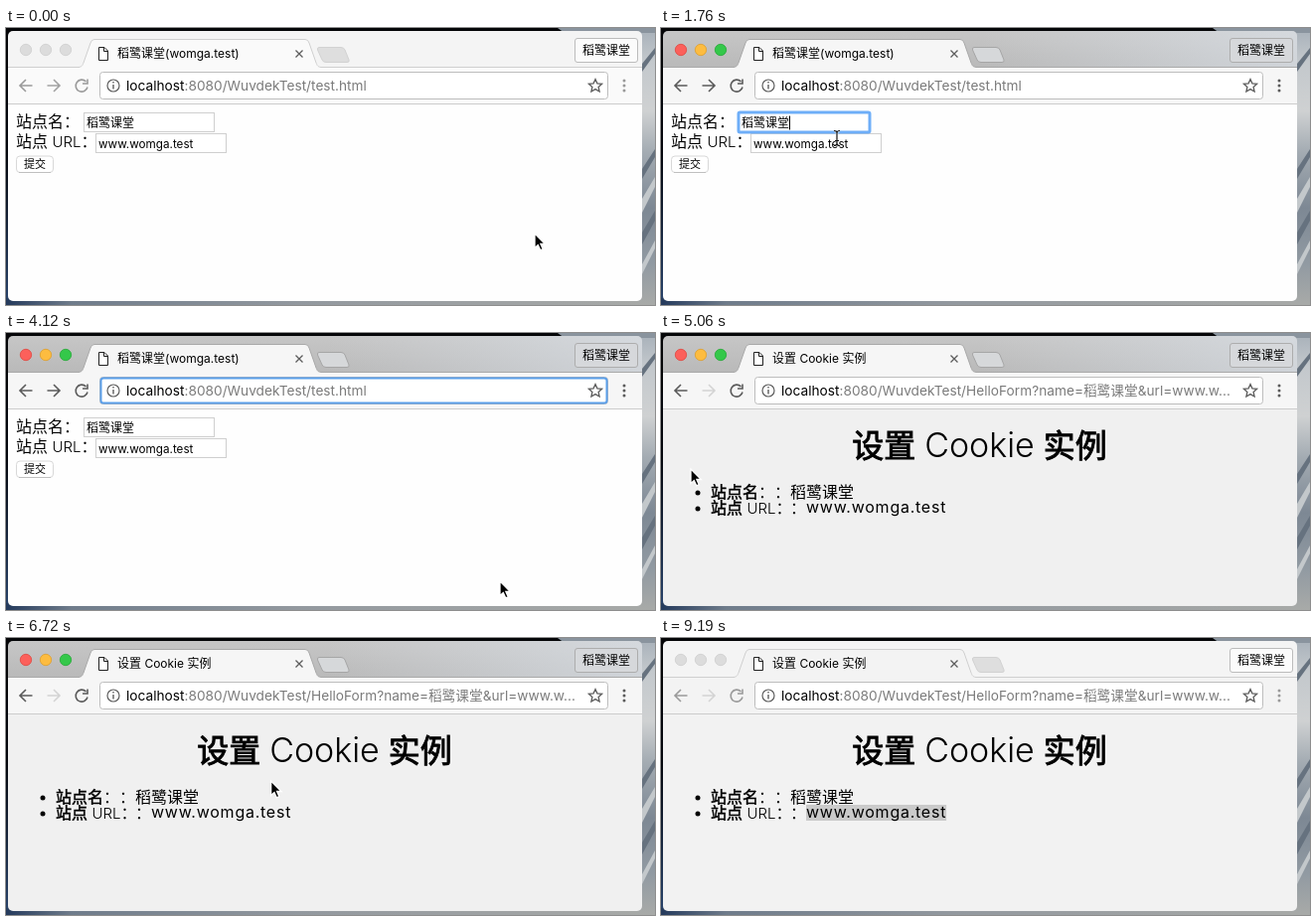
Write an HTML page that moves like this. It is 653 px wide and 279 px high and loops after 9290 ms.

```html
<!DOCTYPE html>
<html lang="zh-CN">
<head>
<meta charset="utf-8">
<title>Form demo</title>
<style>
html, body { margin: 0; width: 100%; height: 100%; overflow: hidden; background: #000; }
svg { display: block; width: 653px; height: 279px; }
text { font-family: Inter, "Noto Sans CJK SC", "Noto Sans CJK", sans-serif; fill: #000; white-space: pre; }
.strip { fill: #f4f4f4; }
.bar { fill: #fafafa; }
.done .bar { fill: #f3f3f3; }
.sheen { display: none; }
.edge { stroke: #cfcfcf; fill: none; }
.plus { fill: #dedede; stroke: #d2d2d2; }
.badge { fill: #fbfbfb; stroke: #bcbcbc; }
.light { fill: #dcdcdc; stroke: #cfcfcf; stroke-width: .8; }
.icon { fill: none; stroke: #9b9b9b; stroke-width: 1.6; }
.dots { fill: #999; }
.next { stroke: #a2a2a2; }
.mark { fill: #cacaca; }
.on .strip { fill: url(#chrome); }
.on .sheen { display: inline; }
.on .bar { fill: #f6f6f6; }
.on .edge { stroke: #a9a9a9; }
.on .plus { fill: #d6d8da; stroke: #a6a6a6; }
.on .badge { fill: #d6d8db; stroke: #adadad; }
.on .icon { stroke: #5b5b5b; }
.on .dots { fill: #5b5b5b; }
.on .red { fill: #fc605b; stroke: #e0473f; }
.on .amber { fill: #fdbc40; stroke: #dd9f2c; }
.on .green { fill: #34c84a; stroke: #25a937; }
.on .mark { fill: #a9cdf5; }
.done .next, .on.done .next { stroke: #d4d4d4; }
.page { fill: #fefefe; }
.done .page { fill: #f2f2f2; }
.on.done .page { fill: #f0f0f0; }
.box { fill: #fff; stroke: #cfcfcf; }
.ring { fill: none; stroke: #6eaef8; stroke-width: 3; }
.grey { fill: #7b7b7b; }
.b { stroke: #000; stroke-width: .03em; }
.thin { font-weight: 300; }
</style>
</head>
<body>
<svg id="stage" viewBox="0 0 653 279">
  <defs>
    <linearGradient id="chrome" x2="0" y2="1">
      <stop stop-color="#c6c6c6"/><stop offset="1" stop-color="#b9b9b9"/>
    </linearGradient>
    <linearGradient id="sheen">
      <stop offset=".5" stop-color="#dfe6ee" stop-opacity="0"/><stop offset="1" stop-color="#dfe6ee" stop-opacity=".6"/>
    </linearGradient>
    <linearGradient id="side" x2="0" y2="1">
      <stop stop-color="#a7b0b9"/><stop offset=".12" stop-color="#c3c8cc"/>
      <stop offset=".3" stop-color="#cfd1d2"/><stop offset=".45" stop-color="#a3abb2"/>
      <stop offset=".65" stop-color="#7d8894"/><stop offset=".85" stop-color="#919aa2"/>
      <stop offset="1" stop-color="#a8aaa8"/>
    </linearGradient>
    <linearGradient id="floor">
      <stop stop-color="#243a5c"/><stop offset=".1" stop-color="#6f7c8b"/>
      <stop offset=".45" stop-color="#93999f"/><stop offset="1" stop-color="#a8aaa8"/>
    </linearGradient>
    <linearGradient id="left" x2="0" y2="1">
      <stop offset=".3" stop-color="#05070d"/><stop offset="1" stop-color="#29446c"/>
    </linearGradient>
    <clipPath id="win"><rect x="2" y="3" width="638" height="272" rx="5"/></clipPath>
  </defs>

  <rect width="653" height="279" fill="#050608"/>
  <rect y="60" width="3" height="219" fill="url(#left)"/>
  <rect y="272" width="653" height="7" fill="url(#floor)"/>
  <rect x="634" width="19" height="279" fill="url(#side)"/>
  <path d="M555 0H653V5H562Z" fill="#8a949e"/>
  <path d="M640 172L653 150V160L640 186ZM640 238L653 214V222L640 248Z" fill="#c3c8cb"/>
  <path d="M640 36L653 20V26L640 44ZM640 142L653 122V130L640 152ZM640 206L653 184V194L640 218Z" fill="#66727f"/>

  <g clip-path="url(#win)">
    <rect class="strip" x="2" y="3" width="638" height="37"/>
    <rect class="sheen" x="2" y="3" width="638" height="37" fill="url(#sheen)"/>
    <rect class="bar" x="2" y="39" width="638" height="38"/>
    <path class="edge" d="M2 39.5H74M317 39.5H640"/>
    <path class="bar" d="M73 40C77 39 77 37 78 35L85 15Q86 11.500 89 11.500H301Q304 11.500 305 15L312 35C313 37 313 39 317 40Z"/>
    <path class="edge" d="M73 39.500C77 39 77 37 78 35L85 15Q86 11.500 89 11.500H301Q304 11.500 305 15L312 35C313 37 313 39 317 39.500"/>
    <path class="plus" d="M315 19.500H337Q340 19.500 341 22L345 32Q346 34.500 343 34.500H322Q319 34.500 318 32L313.500 22Q313 19.500 315 19.500Z"/>
    <circle class="light red" cx="20" cy="22" r="5.700"/>
    <circle class="light amber" cx="40" cy="22" r="5.700"/>
    <circle class="light green" cx="60" cy="22" r="5.700"/>
    <path d="M93.500 19.500H99L102.500 23V32.500H93.500ZM98.500 19.500V23.500H102.500" fill="#fff" stroke="#222"/>
    <text id="title" x="112" y="30" font-size="12"></text>
    <path d="M291.500 22.500l7 7m0-7l-7 7" stroke="#5c5c5c" stroke-width="1.300"/>
    <rect class="badge" x="572.500" y="10.500" width="63" height="24" rx="2.500"/>
    <text id="badge" x="580" y="27" font-size="12"></text>

    <path class="icon" d="M26.500 58H14.500M20 52L14 58L20 64"/>
    <path class="icon next" d="M41.500 58H53.500M48 52L54 58L48 64"/>
    <path class="icon" d="M80.500 54A6 6 0 1 0 82 59.500M82 51.500V56H77"/>
    <rect class="box" x="94.500" y="44.500" width="511" height="27" rx="3" style="stroke:#bdbdbd"/>
    <rect id="omni" x="95.500" y="45.500" width="509" height="25" rx="2.500" fill="none" stroke="#5b9fe9" stroke-width="2"/>
    <circle cx="108" cy="58" r="6" fill="none" stroke="#5d5d5d" stroke-width="1.200"/>
    <path d="M108 57V61.500M108 54V55.500" stroke="#5d5d5d" stroke-width="1.400"/>
    <text x="121" y="63" font-size="13.700">localhost<tspan id="url" class="grey"></tspan></text>
    <path d="M593 51.500l1.900 4.300 4.700.5-3.500 3.100 1 4.600-4.100-2.400-4.100 2.400 1-4.600-3.500-3.100 4.700-.5Z" fill="none" stroke="#5d5d5d" stroke-width="1.300"/>
    <g class="dots"><circle cx="622" cy="53" r="1.500"/><circle cx="622" cy="58" r="1.500"/><circle cx="622" cy="63" r="1.500"/></g>

    <rect class="page" x="2" y="76" width="638" height="200"/>
    <path class="edge" d="M2 76.500H640" style="stroke:#cccccc"/>

    <g id="form">
      <text x="10" y="100" font-size="16">站点名：</text>
      <text x="10" y="120" font-size="16">站点 <tspan class="thin" font-size="15">URL</tspan>：</text>
      <rect class="box" x="78.500" y="85.500" width="131" height="19"/>
      <rect class="box" x="90.500" y="106.500" width="131" height="19"/>
      <rect class="ring" id="ring1" x="78" y="85" width="132" height="20" rx="1.500"/>
      <rect class="ring" id="ring2" x="90" y="106" width="132" height="20" rx="1.500"/>
      <text id="field1" x="81" y="100" font-size="12"></text>
      <text id="field2" x="93" y="121" font-size="11.700"></text>
      <rect x="10.500" y="129" width="37" height="16.500" rx="3.500" fill="#fff" stroke="#d8d8d8"/>
      <path d="M13 145.500H45" stroke="#bfbfbf"/>
      <text x="29" y="141" font-size="11" text-anchor="middle">提交</text>
    </g>

    <g id="result">
      <text x="320.500" y="125" font-size="32" text-anchor="middle"><tspan class="b">设置</tspan> <tspan class="thin" font-size="34">Cookie</tspan> <tspan class="b">实例</tspan></text>
      <rect class="mark" id="mark1" x="130" y="152" height="16"/>
      <rect class="mark" id="mark2" x="146" y="168" height="16"/>
      <circle cx="37" cy="161" r="2.500"/><circle cx="37" cy="177" r="2.500"/>
      <g font-size="16">
        <text x="50" y="166"><tspan class="b">站点名</tspan>：</text><text x="114" y="166">：</text>
        <text id="out1" x="130" y="166"></text>
        <text x="50" y="182"><tspan class="b">站点</tspan> <tspan class="thin" font-size="15">URL</tspan>：</text><text x="130" y="182">：</text>
        <text id="out2" x="146" y="181" letter-spacing=".75"></text>
      </g>
    </g>
    <path id="caret" stroke="#000"/>
  </g>

  <path id="arrow" d="M0 0V14.500L3.300 11.500 5.700 16.800 8.200 15.700 5.900 10.500H10.400Z" fill="#000" stroke="#fff" stroke-width="1.300"/>
  <g id="beam" fill="none">
    <path d="M-3-7.500Q0-7.500 0-5.500Q0-7.500 3-7.500M0-5.500V5.500M-3 7.500Q0 7.500 0 5.500Q0 7.500 3 7.500M-2 2.500H2" stroke="#fff" stroke-width="2.600" opacity=".7"/>
    <path d="M-3-7.500Q0-7.500 0-5.500Q0-7.500 3-7.500M0-5.500V5.500M-3 7.500Q0 7.500 0 5.500Q0 7.500 3 7.500M-2 2.500H2" stroke="#111" stroke-width="1.200"/>
  </g>
</svg>
<script>
const LOOP = 9290, TICK = 117.7;
const SITE = '稻鹭课堂', HOST = 'womga.test';
const $ = id => document.getElementById(id);
const show = (id, on) => $(id).setAttribute('display', on ? 'inline' : 'none');
const put = (id, s) => { if ($(id).textContent !== s) $(id).textContent = s; };

// Pointer path: tick, x, y, shape used from here on
const path = [
  [0, 532, 207, 'arrow'], [2, 533, 208, 'arrow'], [3, 532, 207, 'arrow'], [6, 532, 207, 'arrow'],
  [8, 440, 172, 'arrow'], [10, 240, 110, 'beam'], [12, 178, 97, 'beam'], [14, 178, 97, 'beam'],
  [15, 177, 111, 'beam'], [16, 175, 116, 'beam'], [18, 175, 116, 'arrow'], [22, 334, 79, 'beam'],
  [23, 335, 66, 'beam'], [30, 335, 65, 'arrow'], [33, 533, 258, 'arrow'], [35, 497, 250, 'arrow'],
  [38, 84, 145, 'arrow'], [40, 30, 137, 'arrow'], [43, 30, 137, 'arrow'], [46, 91, 134, 'arrow'],
  [48, 189, 130, 'arrow'], [51, 440, 115, 'arrow'], [53, 492, 113, 'arrow'], [55, 480, 116, 'arrow'],
  [58, 160, 158, 'beam'], [59, 131, 160, 'beam'], [62, 195, 161, 'beam'], [64, 185, 172, 'beam'],
  [65, 167, 178, 'beam'], [66, 146, 177, 'beam'], [69, 300, 178, 'beam'], [70, 389, 184, 'arrow'],
  [72, 500, 235, 'arrow'], [73, 606, 281, 'arrow']
];

function pointer(k) {
  let i = path.length - 1;
  while (path[i][0] > k) i--;
  const a = path[i], b = path[i + 1] || a;
  const u = b === a ? 0 : (k - a[0]) / (b[0] - a[0]);
  return { x: a[1] + (b[1] - a[1]) * u, y: a[2] + (b[2] - a[2]) * u, shape: a[3] };
}

function select(id, out, x, dragging, on, px) {
  const full = $(out).getComputedTextLength();
  const w = dragging ? Math.min(full, Math.max(0, px - x)) : full;
  $(id).setAttribute('width', on ? w : 0);
}

function draw(t) {
  const k = Math.floor((t + 6) / TICK);
  const within = (a, b) => k >= a && k < b;
  const done = k >= 42, p = pointer(k);

  $('stage').setAttribute('class', (within(5, 78) ? 'on ' : '') + (done ? 'done' : ''));
  put('title', done ? '设置 Cookie 实例' : `${SITE}(${HOST})`);
  put('url', ':8080/WuvdekTest/' + (done ? `HelloForm?name=${SITE}&url=www.w...` : 'test.html'));
  show('form', !done);
  show('result', done);
  show('ring1', within(12, 17));
  show('ring2', within(17, 23));
  show('omni', within(23, 42));

  const blink = start => Math.floor((k - start) / 4) % 2 === 0;
  let caret = '';
  if (within(12, 17)) caret = 'M129.500 88.500V102.500';
  else if (within(17, 23) && blink(17)) caret = 'M190.500 109.500V123.500';
  else if (within(23, 42) && blink(23)) caret = 'M336.500 50.500V66.500';
  $('caret').setAttribute('d', caret);

  select('mark1', 'out1', 130, k < 62, within(59, 66), p.x);
  select('mark2', 'out2', 146, k < 70, k >= 66, p.x);

  for (const s of ['arrow', 'beam']) {
    show(s, s === p.shape && k < 73);
    $(s).setAttribute('transform', `translate(${p.x} ${p.y})`);
  }
}

for (const id of ['badge', 'field1', 'out1']) put(id, SITE);
for (const id of ['field2', 'out2']) put(id, 'www.' + HOST);

const start = performance.now();
function loop() {
  draw((performance.now() - start) % LOOP);
  requestAnimationFrame(loop);
}
loop();
</script>
</body>
</html>
```
